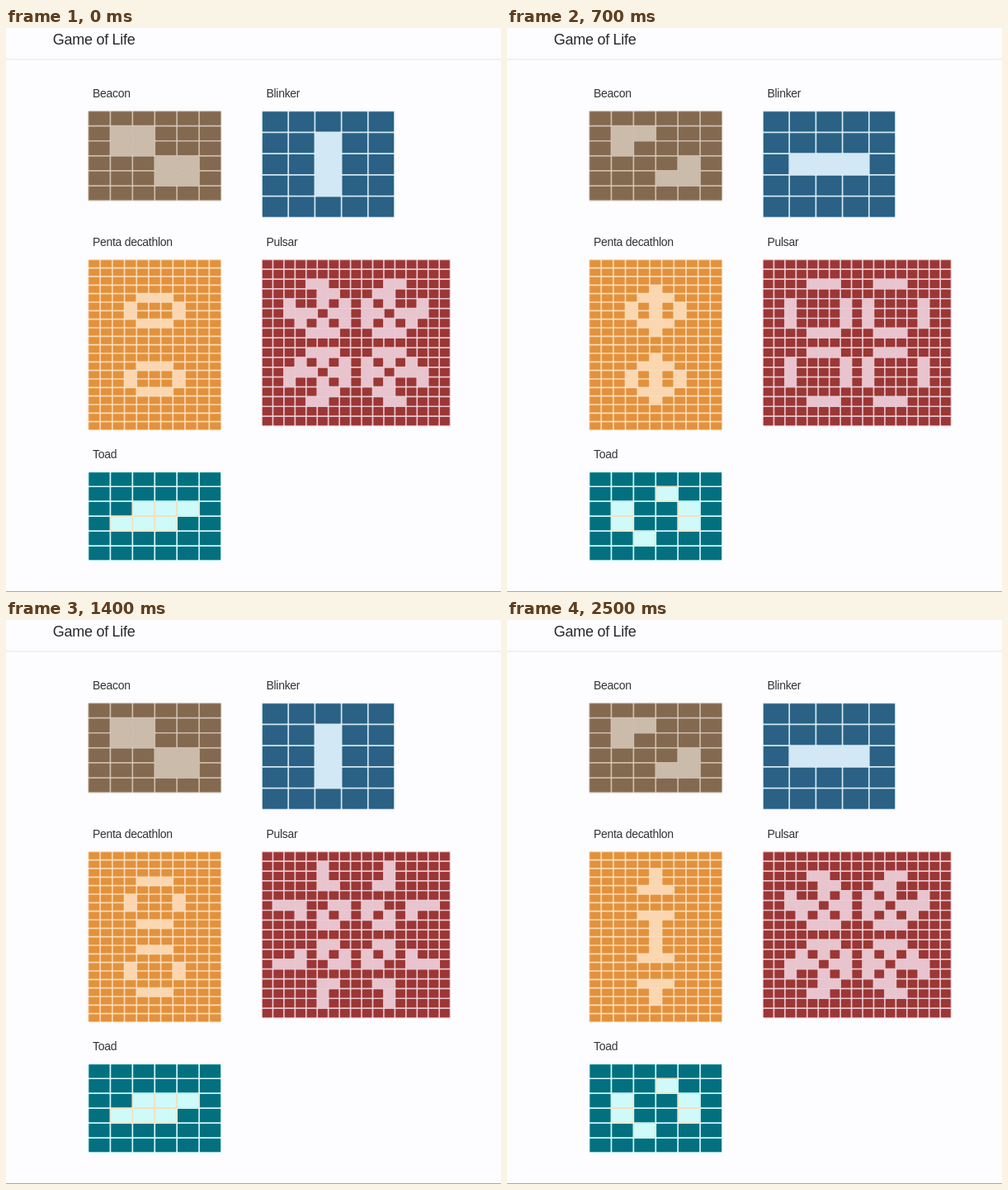
Recreate the animation shown at these times as an HTML page. Size 600 by 683 pixels, loop 2.6 s.

```html
<!DOCTYPE html>
<html lang="en">
<head>
<meta charset="utf-8">
<title>Game of Life</title>
<style>
html, body { margin: 0; width: 100%; height: 100%; overflow: hidden; background: #fdfcfe; }
svg { display: block; width: 600px; height: 683px; }
text { font-family: "Liberation Sans", Arial, sans-serif; font-size: 14px; letter-spacing: -0.3px; fill: #333; }
.title { font-size: 18px; letter-spacing: -0.28px; fill: #292929; }
</style>
</head>
<body>
<svg id="stage" viewBox="0 0 600 683">
  <rect y="37.5" width="600" height="1" fill="#e5e4e7"/>
  <rect y="682" width="600" height="1" fill="#a9a8ab"/>
  <text class="title" x="56.8" y="19.5">Game of Life</text>
</svg>
<script>
const LOOP = 2600, TICK = 1000, LEAD = 600, GENERATIONS = 4;
const stage = document.getElementById('stage');

function add(tag, attrs) {
  const node = document.createElementNS('http://www.w3.org/2000/svg', tag);
  for (const key in attrs) node.setAttribute(key, attrs[key]);
  stage.appendChild(node);
  return node;
}

// Seeds are [column, row] pairs.
const ring = top => [4, 5, 6].flatMap(c => [[c, top], [c, top + 3]])
  .concat([3, 7].flatMap(c => [[c, top + 1], [c, top + 2]]));

const bars = [2, 7, 9, 14].flatMap(line =>
  [4, 5, 6, 10, 11, 12].flatMap(i => [[line, i], [i, line]]));

const boards = [
  { name: 'Beacon', x: 99.5, y: 100.5, w: 161.5, h: 108.7, cols: 6, rows: 6,
    dead: '#83694f', live: '#cbbbab',
    seed: [[1, 1], [2, 1], [1, 2], [2, 2], [3, 3], [4, 3], [3, 4], [4, 4]] },
  { name: 'Blinker', x: 310, y: 100.5, w: 161, h: 129, cols: 5, rows: 5,
    dead: '#2a6184', live: '#d2e8f4', seed: [[2, 1], [2, 2], [2, 3]] },
  { name: 'Penta decathlon', x: 99.5, y: 280.3, w: 161.5, h: 206.7, cols: 11, rows: 20,
    dead: '#e2923d', live: '#fad7b1', seed: [...ring(4), ...ring(12)] },
  { name: 'Pulsar', x: 310, y: 280.3, w: 228.6, h: 201.7, cols: 17, rows: 17,
    dead: '#9b3735', live: '#e8c4ce', seed: bars, skip: 2 },
  { name: 'Toad', x: 99.5, y: 537.3, w: 161.5, h: 107.7, cols: 6, rows: 6,
    dead: '#037080', live: '#cffafa', edge: '#f6dcb8',
    seed: [[2, 2], [3, 2], [4, 2], [1, 3], [2, 3], [3, 3]] }
];

function evolve(cells, cols, rows) {
  return cells.map((alive, i) => {
    const c = i % cols, r = (i - c) / cols;
    let near = -alive;
    for (let y = Math.max(0, r - 1); y <= Math.min(rows - 1, r + 1); y++)
      for (let x = Math.max(0, c - 1); x <= Math.min(cols - 1, c + 1); x++)
        near += cells[y * cols + x];
    return near === 3 || (alive && near === 2) ? 1 : 0;
  });
}

function build(board) {
  const { x, y, w, h, cols, rows, seed, skip = 0 } = board;
  const cw = w / cols, ch = h / rows, bleed = 0.2, inset = 0.85;
  add('text', { x: x + 5.5, y: y - 16.7 }).textContent = board.name;

  const box = (i, pad, rx) => add('rect', {
    x: x + (i % cols) * cw + pad, y: y + Math.floor(i / cols) * ch + pad,
    width: cw - 2 * pad, height: ch - 2 * pad, rx
  });
  let cells = Array(cols * rows).fill(0);
  seed.forEach(([c, r]) => { cells[r * cols + c] = 1; });
  board.frames = cells.map((_, i) => box(i, -bleed, 1.3));
  board.fills = cells.map((_, i) => box(i, inset, 0.6));

  board.history = [];
  for (let g = 0; g < skip + GENERATIONS; g++) {
    if (g >= skip) board.history.push(cells);
    cells = evolve(cells, cols, rows);
  }
}

function paint(board, generation) {
  const { dead, live, edge = live } = board;
  board.history[generation].forEach((alive, i) => {
    board.frames[i].setAttribute('fill', alive ? edge : live);
    board.fills[i].setAttribute('fill', alive ? live : dead);
  });
}

let shown = -1;
function render(time) {
  const generation = Math.floor((time % LOOP + LEAD) / TICK);
  if (generation === shown) return;
  shown = generation;
  boards.forEach(board => paint(board, generation));
}

boards.forEach(build);
render(0);
const start = performance.now();
function frame() {
  render(performance.now() - start);
  requestAnimationFrame(frame);
}
requestAnimationFrame(frame);
</script>
</body>
</html>
```
